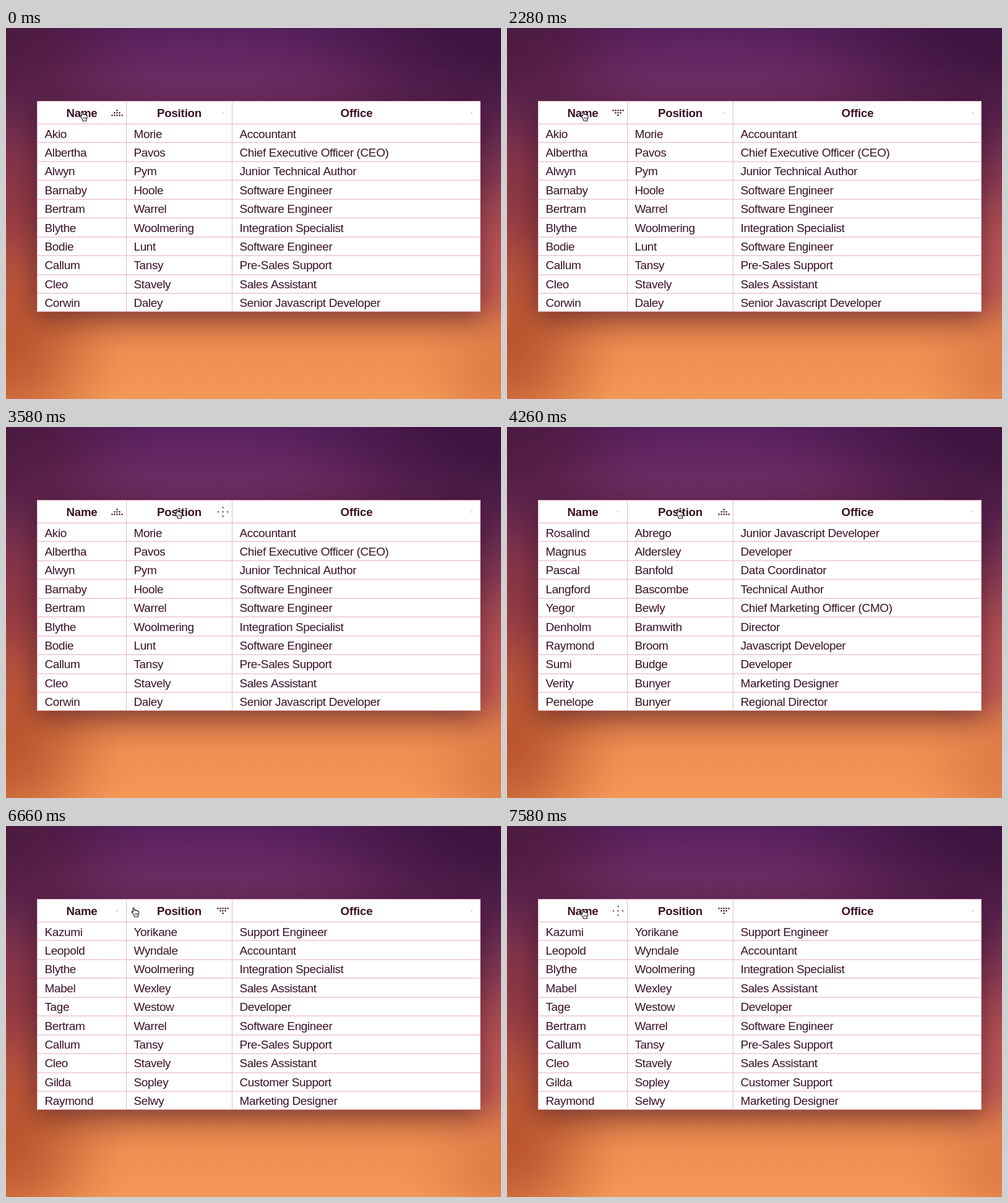
Animation, 800 px wide and 600 px high, one loop 8000 ms. Source, as an HTML page with a canvas:

```html
<!DOCTYPE html>
<html lang="en">
<head>
<meta charset="utf-8">
<title>Sortable table</title>
<style>
  html, body { margin: 0; width: 100%; height: 100%; overflow: hidden; background: #5a2262; }
  canvas { display: block; width: 800px; height: 600px; }
</style>
</head>
<body>
<canvas id="stage" width="800" height="600"></canvas>
<script>
const W = 800, H = 600, LOOP = 8000;
const ctx = document.getElementById('stage').getContext('2d');
const FONT = '"Liberation Sans", Arial, sans-serif';
const INK = '#3a1028';

const table = { x: 50, y: 118, w: 717, h: 341, head: 155, pitch: 30.45 };
const textX = [62.5, 206.5, 377.5];
const headers = [['Name', 122.5], ['Position', 280], ['Office', 566.5]];

const parse = text => text.trim().split('\n').map(line => line.trim().split('|'));

const byNameUp = parse(`
  Akio|Morie|Accountant
  Albertha|Pavos|Chief Executive Officer (CEO)
  Alwyn|Pym|Junior Technical Author
  Barnaby|Hoole|Software Engineer
  Bertram|Warrel|Software Engineer
  Blythe|Woolmering|Integration Specialist
  Bodie|Lunt|Software Engineer
  Callum|Tansy|Pre-Sales Support
  Cleo|Stavely|Sales Assistant
  Corwin|Daley|Senior Javascript Developer`);

const byNameDown = parse(`
  Zelmira|Saldero|Software Engineer
  Zdenka|Frost|Software Engineer
  Yegor|Bewly|Chief Marketing Officer (CMO)
  Violet|Hasker|Financial Controller
  Verity|Bunyer|Marketing Designer
  Tristan|Meadle|Office Manager
  Torin|Nevett|System Architect
  Tage|Westow|Developer
  Svetlana|Fetherstow|Regional Director
  Sumi|Budge|Developer`);

const byPositionUp = parse(`
  Rosalind|Abrego|Junior Javascript Developer
  Magnus|Aldersley|Developer
  Pascal|Banfold|Data Coordinator
  Langford|Bascombe|Technical Author
  Yegor|Bewly|Chief Marketing Officer (CMO)
  Denholm|Bramwith|Director
  Raymond|Broom|Javascript Developer
  Sumi|Budge|Developer
  Verity|Bunyer|Marketing Designer
  Penelope|Bunyer|Regional Director`);

const byPositionDown = parse(`
  Kazumi|Yorikane|Support Engineer
  Leopold|Wyndale|Accountant
  Blythe|Woolmering|Integration Specialist
  Mabel|Wexley|Sales Assistant
  Tage|Westow|Developer
  Bertram|Warrel|Software Engineer
  Callum|Tansy|Pre-Sales Support
  Cleo|Stavely|Sales Assistant
  Gilda|Sopley|Customer Support
  Raymond|Selwy|Marketing Designer`);

const sorts = [[0, byNameUp], [20, byNameDown], [2280, byNameUp], [4080, byPositionUp], [6260, byPositionDown]];

// Sort icons: nine dots that travel between four shapes.
const pyramid = dir => [0, 1, 2].flatMap(row =>
  Array.from({ length: row * 2 + 1 }, (_, i) => [(i - row) * 4, (row - 1) * 4 * dir]));
const shapes = {
  dot: { pts: Array(9).fill([0, 0]), r: 1, rgb: [206, 164, 184] },
  cross: {
    pts: [[0, -7], [-7.5, 0], [0, 0], [7.5, 0], [-7.5, 0], [0, 0], [0, 7], [0, 0], [7.5, 0]],
    r: 1.2, rgb: [120, 58, 84]
  },
  up: { pts: pyramid(1), r: 1.3, rgb: [62, 18, 42] },
  down: { pts: pyramid(-1), r: 1.3, rgb: [62, 18, 42] }
};

// Each step: start, shape, duration.
const icons = [
  { x: 179.5, steps: [[0, 'up', 1], [20, 'down', 260], [2280, 'up', 200], [4080, 'dot', 180], [6705, 'cross', 200]] },
  { x: 350.5, steps: [[0, 'dot', 1], [3160, 'cross', 200], [4080, 'up', 180], [6260, 'down', 200]] },
  { x: 752.5, steps: [[0, 'dot', 1]] }
];

// Pointer moves: start, end, from, to.
const moves = [
  [2980, 3580, [119, 135], [272.5, 132.5]],
  [6460, 7060, [272.5, 132.5], [135.3, 131]],
  [7080, 7580, [135.3, 131], [118.5, 134.5]]
];

const hand = new Path2D('M4.6 13.4Q3.6 11.2 2.3 9.7L.9 7.9Q.3 6.8 1.2 6.4Q2 6.1 3.4 7.5' +
  'L2.6 2.2Q2.5.7 3.5.6Q4.5.5 4.8 1.9L5.4 5Q5.7 4.1 6.5 4.1Q7.5 4.2 7.7 5.2Q8.2 4.5 9 4.7' +
  'Q9.8 5 9.9 6Q10.6 5.4 11.3 6Q12.3 6.8 12.2 8.7Q12.1 10.8 11 12.7L10.8 15.2L4.9 15.2Z');
const knuckles = new Path2D('M6.3 9.2V12.4M8.2 9.2V12.4M10 9.2V12.4');

const lerp = (a, b, p) => a + (b - a) * p;
const clamp = p => Math.max(0, Math.min(1, p));
const smooth = p => p * p * (3 - 2 * p);
const easeOut = p => 1 - Math.pow(1 - p, 1.75);
const lastBefore = (list, t) => list.reduce((best, item, i) => item[0] <= t ? i : best, 0);

function glow(c, x, y, rx, ry, rgb, alpha) {
  c.save();
  c.translate(x, y);
  c.scale(rx, ry);
  const g = c.createRadialGradient(0, 0, 0, 0, 0, 1);
  for (let i = 0; i <= 8; i++) {
    g.addColorStop(i / 8, `rgba(${rgb},${alpha * (1 - smooth(i / 8))})`);
  }
  c.fillStyle = g;
  c.fillRect(-1, -1, 2, 2);
  c.restore();
}

function makeBackdrop() {
  const canvas = document.createElement('canvas');
  canvas.width = W;
  canvas.height = H;
  const c = canvas.getContext('2d');

  const sky = c.createLinearGradient(0, 0, 0, H);
  [[0, '#572060'], [0.1, '#672964'], [0.2, '#702d60'], [0.4, '#8c3b54'], [0.6, '#b4504c'],
   [0.72, '#c8624a'], [0.8, '#de7c49'], [0.88, '#f09052'], [1, '#f59857']]
    .forEach(([at, color]) => sky.addColorStop(at, color));
  c.fillStyle = sky;
  c.fillRect(0, 0, W, H);

  glow(c, 0, 30, 260, 250, '72,24,50', 0.7);
  glow(c, 800, 20, 420, 270, '54,15,54', 0.8);
  glow(c, 0, 280, 180, 170, '136,48,58', 0.6);
  glow(c, 0, 510, 210, 240, '178,76,42', 0.85);
  glow(c, 800, 385, 150, 140, '192,84,92', 0.6);
  glow(c, 820, 560, 190, 140, '208,108,62', 0.6);

  c.save();
  c.shadowColor = 'rgba(25,5,20,.48)';
  c.shadowBlur = 42;
  c.shadowOffsetY = 9;
  c.fillStyle = '#fff';
  c.fillRect(table.x, table.y, table.w, table.h);
  c.restore();

  c.fillStyle = '#eab6c9';
  const { x, y, w, h, head, pitch } = table;
  for (let i = 0; i < 10; i++) c.fillRect(x, Math.round(head + i * pitch) - 0.5, w, 1.2);
  for (const cx of [x, 194, 365, x + w - 1]) c.fillRect(cx, y, 1, h);
  c.fillRect(x, y, w, 1);
  c.fillRect(x, y + h - 1, w, 1);
  return canvas;
}

function drawText(rows) {
  ctx.fillStyle = INK;
  ctx.textBaseline = 'alphabetic';
  ctx.textAlign = 'center';
  ctx.letterSpacing = '-0.2px';
  ctx.font = `bold 18.7px ${FONT}`;
  for (const [label, x] of headers) ctx.fillText(label, x, 143.7);

  ctx.textAlign = 'left';
  ctx.letterSpacing = '-0.38px';
  ctx.font = `19px ${FONT}`;
  rows.forEach((row, i) => row.forEach((cell, col) =>
    ctx.fillText(cell, textX[col], 177.5 + i * 30.42)));
}

function drawIcon({ x, steps }, t) {
  const i = lastBefore(steps, t);
  const [start, name, length] = steps[i];
  const to = shapes[name], from = shapes[steps[Math.max(0, i - 1)][1]];
  const p = smooth(clamp((t - start) / length));
  ctx.fillStyle = `rgb(${to.rgb.map((v, k) => Math.round(lerp(from.rgb[k], v, p)))})`;
  const r = lerp(from.r, to.r, p);
  ctx.beginPath();
  to.pts.forEach(([px, py], k) => {
    const dx = x + lerp(from.pts[k][0], px, p);
    const dy = 137.3 + lerp(from.pts[k][1], py, p);
    ctx.moveTo(dx + r, dy);
    ctx.arc(dx, dy, r, 0, Math.PI * 2);
  });
  ctx.fill();
}

function drawHand(t) {
  const [start, end, from, to] = moves[lastBefore(moves, t)];
  const p = easeOut(clamp((t - start) / (end - start)));
  ctx.save();
  ctx.translate(lerp(from[0], to[0], p), lerp(from[1], to[1], p));
  ctx.lineJoin = 'round';
  ctx.fillStyle = '#fff';
  ctx.fill(hand);
  ctx.strokeStyle = '#1c1218';
  ctx.lineWidth = 1.1;
  ctx.stroke(hand);
  ctx.lineWidth = 0.8;
  ctx.stroke(knuckles);
  ctx.restore();
}

const backdrop = makeBackdrop();

function frame() {
  const t = performance.now() % LOOP;
  ctx.drawImage(backdrop, 0, 0);
  drawText(sorts[lastBefore(sorts, t)][1]);
  icons.forEach(icon => drawIcon(icon, t));
  drawHand(t);
  requestAnimationFrame(frame);
}
frame();
</script>
</body>
</html>
```
